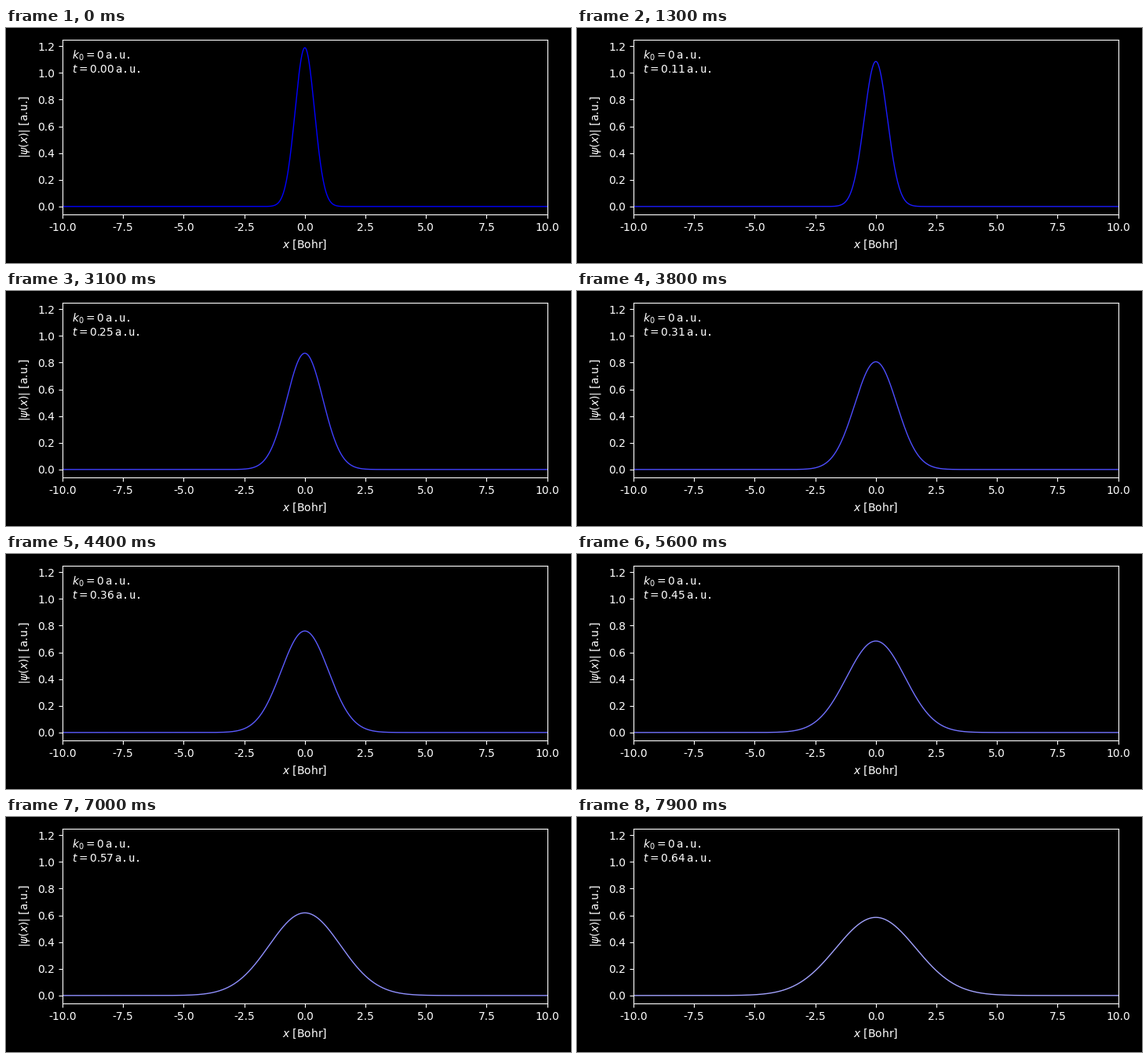
A matplotlib script for the animation above (8000 ms loop, 720x300 px).

```python
import numpy as np
import matplotlib.pyplot as plt
from matplotlib.animation import FuncAnimation

FRAMES = 80
INTERVAL = 100      # ms
DT = 0.8 / 99       # time step in atomic units
ALPHA = np.pi       # exponent of the initial Gaussian
K0 = 0

plt.style.use("dark_background")
plt.rcParams.update({
    "font.family": "DejaVu Sans",
    "font.size": 10,
    "axes.labelpad": 5,
    "axes.unicode_minus": False,
})


def packet(x, t):
    """Modulus of a freely spreading Gaussian wave packet."""
    spread = 1 + (2 * ALPHA * t) ** 2
    norm = (2 * ALPHA / np.pi / spread) ** 0.25
    return norm * np.exp(-ALPHA * (x - K0 * t) ** 2 / spread)


def caption(t):
    return f"$k_0={K0}\\,$a.u.\n$t={t:.2f}\\,$a.u."


x = np.linspace(-10, 10, 1001)
peak = packet(0, 0)

fig, ax = plt.subplots(figsize=(7.2, 3), dpi=100)
line, = ax.plot(x, packet(x, 0), color="blue", lw=1)
ax.set_xlim(-10, 10)
ax.set_ylim(-0.05 * peak, 1.05 * peak)
ax.set_xlabel(r"$x$ [Bohr]")
ax.set_ylabel(r"$|\psi(x)|$ [a.u.]")
fig.tight_layout()
fig.subplots_adjust(left=72 / 720, bottom=62 / 300)

label = ax.text(-9.6, 1.0, caption(0), family="DejaVu Sans Mono")


def update(i):
    t = i * DT
    line.set_ydata(packet(x, t))
    line.set_color((t, t, 1))
    label.set_text(caption(t))
    return line, label


anim = FuncAnimation(fig, update, frames=FRAMES, interval=INTERVAL,
                     repeat=True, repeat_delay=0)
plt.show()
```
